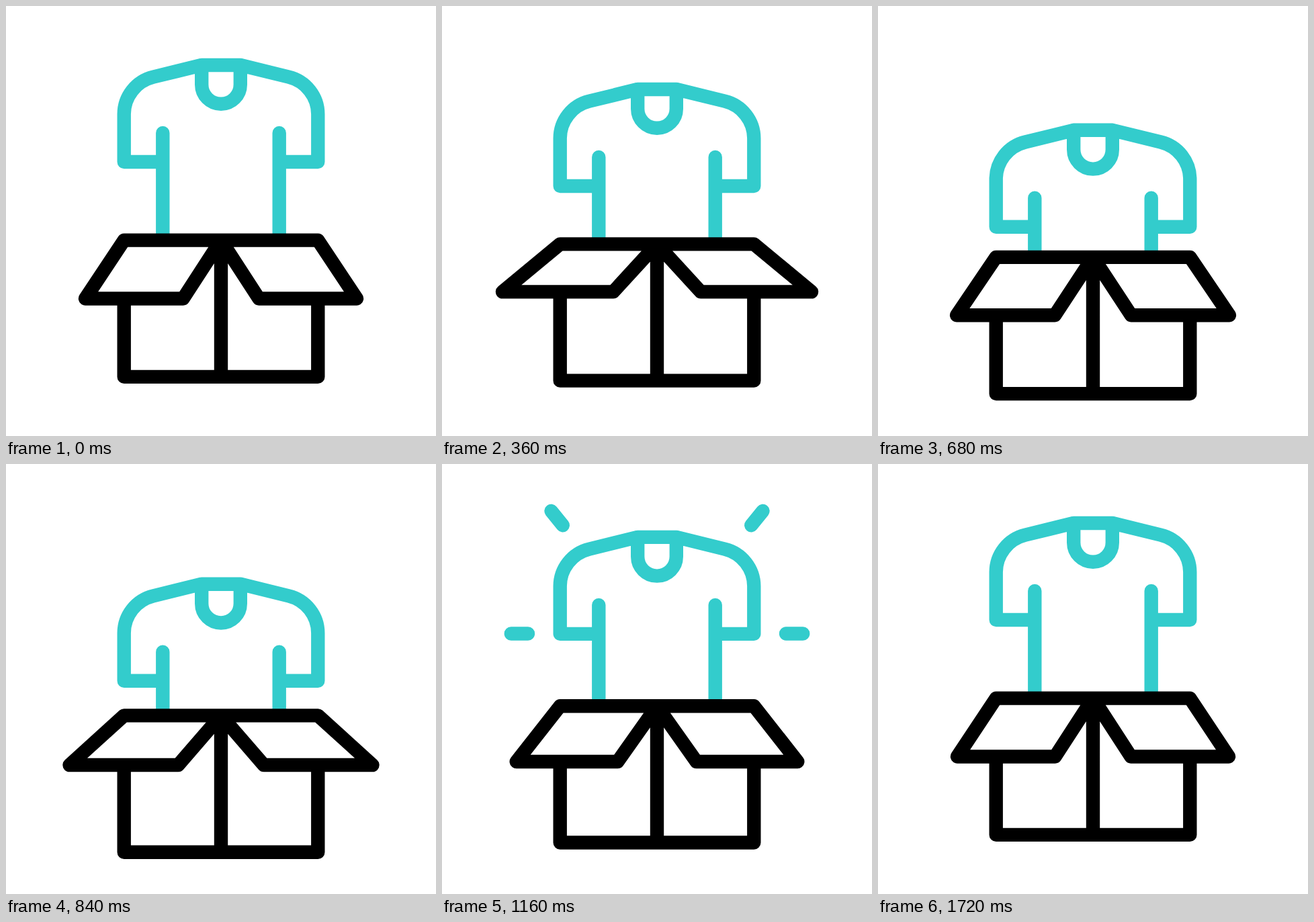
Animation, 640 px wide and 640 px high, one loop 1760 ms. Source, as an HTML page:

```html
<!DOCTYPE html>
<html>
<head>
<meta charset="utf-8">
<style>
html, body { margin: 0; height: 100%; overflow: hidden; background: #fff; }
svg { display: block; width: 100%; height: 100%; }
</style>
</head>
<body>
<svg viewBox="0 0 640 640" fill="none" stroke-width="20.4" stroke-linecap="round" stroke-linejoin="round">
  <clipPath id="above"><rect id="mask" width="640" height="348.5"/></clipPath>
  <g clip-path="url(#above)" stroke="#3cc">
    <g id="shirt">
      <path d="M291 88H349L420.8 105.7A57 57 0 0 1 464.3 161V232H407M291 88L219.2 105.7A57 57 0 0 0 175.7 161V232H233M291.2 88V117A28.8 28.8 0 0 0 348.8 117V88M233.3 189V450M406.7 189V450"/>
      <path id="rays"/>
    </g>
  </g>
  <path id="box" stroke="#000"/>
</svg>
<script>
const LOOP = 1760, STEP = 40;
const el = id => document.getElementById(id);

// Symmetric ease-in-out from 0 to 1
function ease(t, start, end, power = 2) {
  const u = Math.min(1, Math.max(0, (t - start) / (end - start)));
  return u < .5 ? (2 * u) ** power / 2 : 1 - (2 - 2 * u) ** power / 2;
}

const shirtDrop = t => 97.6 * (ease(t, 89, 720) - ease(t, 664, 1434, 2.5));
const boxDrop = t => 25.8 * (ease(t, 170, 740) - ease(t, 836, 1452));

// The flaps swing out and back, then out again with a slow settle
function flapSpread(t) {
  const swing = 28.9 * (ease(t, 80, 400) - ease(t, 400, 720));
  const settle = 22.8 * 2 ** ((880 - t) / 170) * (1 - ease(t, 1320, 1720));
  return swing + ease(t, 720, 880) * settle;
}

function rays(t) {
  if (t <= 960 || t >= 1400) return "";
  const inner = 70 * ease(t, 1070, 1410), outer = 70 * ease(t, 960, 1360);
  const ray = (side, x, y, dx, dy) => {
    const at = d => `${320 + side * (x + dx * d)} ${y + dy * d}`;
    return `M${at(inner)}L${at(outer)}`;
  };
  return [-1, 1].map(side =>
    ray(side, 182.2, 231.7, 1, 0) + ray(side, 133.5, 78.7, .685, -.845)).join("");
}

function box(top, spread) {
  const edge = top + 86.9 - spread * .565, base = top + 203.3;
  const flap = side => {
    const x = d => 320 + side * d;
    return `M320 ${top}H${x(144.3)}L${x(202 + spread)} ${edge}H${x(56.4 + spread * .31)}Z`;
  };
  return flap(-1) + flap(1) +
    `M175.7 ${edge}V${base}H464.3V${edge}M320 ${top}V${base}`;
}

function draw(now) {
  const t = Math.floor(now % LOOP / STEP) * STEP;
  const top = 348.6 + boxDrop(t);
  el("shirt").setAttribute("transform", `translate(0 ${shirtDrop(t)})`);
  el("mask").setAttribute("height", top);
  el("rays").setAttribute("d", rays(t));
  el("box").setAttribute("d", box(top, flapSpread(t)));
}

const start = performance.now();
function tick() {
  draw(performance.now() - start);
  requestAnimationFrame(tick);
}
tick();
</script>
</body>
</html>
```
